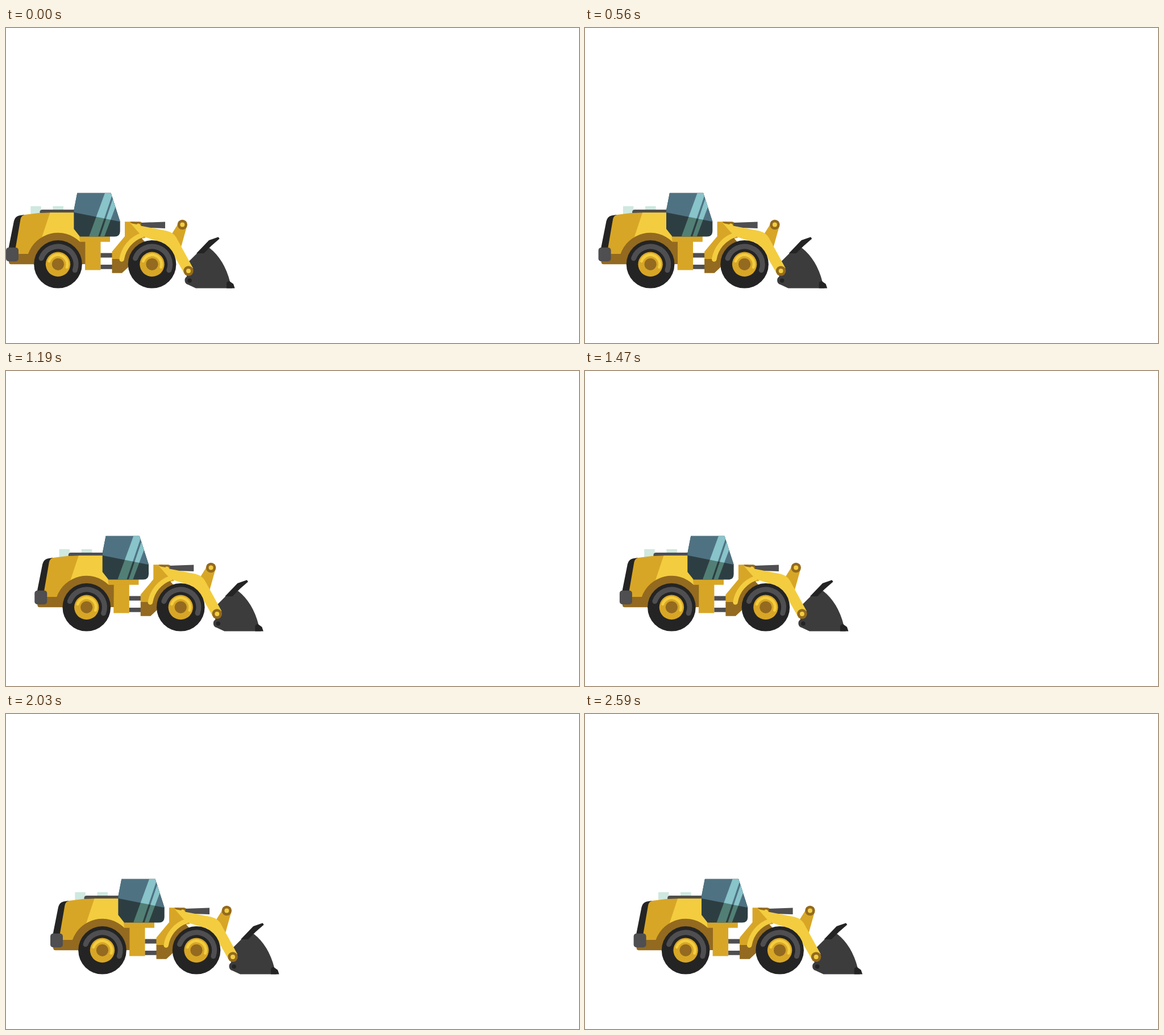
Recreate the animation shown at these times as an HTML page. Size 1008 px wide and 555 px high, loop 5.25 s.

```html
<!DOCTYPE html>
<html lang="en">
<head>
<meta charset="utf-8">
<title>Wheel loader</title>
<style>
  html, body { margin: 0; width: 100%; height: 100%; overflow: hidden; background: #fff; }
  svg { display: block; width: 100%; height: 100%; }
  .gold { fill: #d8a626; }
  .yellow { fill: #f3cd3f; }
  .brown { fill: #936a1f; }
  .steel { fill: #4f4e50; }
  .black { fill: #242424; }
  .mint { fill: #cfe8e0; }
  .shine { fill: none; stroke-linecap: round; }
</style>
</head>
<body>
<svg viewBox="0 0 1008 555">
  <defs>
    <clipPath id="cab">
      <path id="cabShape" d="M125.3 290.8H184.5L200.7 341V358Q200.7 367.5 191 367.5H130L119.4 354V321Z"/>
    </clipPath>
    <clipPath id="cabUpper"><path d="M110 323L210 343V280H110Z"/></clipPath>
    <g id="wheel">
      <circle class="black" r="42.3"/>
      <path class="shine" stroke="#4f4e50" stroke-width="9" d="M-29.5 -10.5A31.4 31.4 0 0 1 29.8 10.5"/>
      <circle class="gold" r="21.7"/>
      <path class="shine" stroke="#f3cd3f" stroke-width="5" d="M-15.6 -5.5A16.3 16.3 0 0 1 15.6 5.2"/>
      <circle class="brown" r="10.6"/>
    </g>
    <g id="bolt">
      <circle class="brown" r="8.7"/>
      <circle class="yellow" r="4"/>
    </g>
    <path id="stripes" d="M174 290.8H188L162 367.5H146ZM190 295L196 306L173 367.5H165.5Z"/>
  </defs>

  <g id="loader">
    <!-- rear body -->
    <path class="mint" d="M43.3 314H61.8V329H43.3ZM82.4 314H101V322H82.4Z"/>
    <path class="steel" d="M59.5 327V324.5Q59.5 320 64 320H121V327Z"/>
    <path class="brown" d="M5 397H60V416.2H9Q5 416.2 5 412Z"/>
    <path class="black" d="M4.5 388L14 340Q16 332 23 330.5L32 329L22 398H5Z"/>
    <path class="gold" d="M15 398L25.5 337Q27 330 33 329L57 326L77 325.3H121V354L130 367H183V376.5H166.5V426.5H139V398Z"/>
    <path class="yellow" d="M77.5 325.3H121V354L131 367V378H60Z"/>
    <path class="brown" d="M39 398A55.5 55.5 0 0 1 130 376.5H139.4V416H39Z"/>
    <path class="gold" d="M129 367H183V376.5H130Z"/>
    <rect class="steel" y="386.8" width="22" height="24.5" rx="5"/>
    <path class="steel" d="M166.5 396.6H188V404.5H166.5ZM166.5 417H188V424.7H166.5Z"/>

    <!-- cab -->
    <use href="#cabShape" fill="#2d3e42"/>
    <g clip-path="url(#cab)">
      <use href="#stripes" fill="#527f75"/>
      <g clip-path="url(#cabUpper)">
        <rect x="110" y="280" width="100" height="70" fill="#4f7282"/>
        <use href="#stripes" fill="#88c4ca"/>
      </g>
    </g>

    <!-- bucket -->
    <path fill="#3c3c3c" d="M358 387.5Q384 408 394 447L398 458.5H334L320 452A7.8 7.8 0 0 1 318 438L316 417L337 396Z"/>
    <path class="black" d="M335 397L357 374L373.5 368.2L375.6 371.2L361 384L348 397Z"/>
    <path class="black" d="M388 458.5V450Q388.5 446 393 446L400 451L402.5 458.5Z"/>
    <circle class="black" cx="323" cy="445" r="3.8"/>

    <!-- front frame and arm -->
    <path class="gold" d="M209 341.3H226L242 362L250 380L210 408H186.5V394L209 367Z"/>
    <path class="brown" d="M186.5 407H200L212 383L238 369L248 383L223 414L204 431.8H186.5Z"/>
    <path class="gold" d="M304 343L289 367L306 393L318 350Z"/>
    <path class="brown" d="M218 341.3H235Q240 341.5 240 347V354H232Z"/>
    <path class="steel" d="M238 343L280 341.5V353L238 351.5Z"/>
    <path class="yellow" d="M219 344L230 346A4 4 0 0 1 237 348.5L283 357.5Q295 361 299.5 369L329 423L315 435L294 398L276 378L246 369L234 361Z"/>
    <path class="shine" stroke="#f3cd3f" stroke-width="8.5" d="M203.6 407.5A54 54 0 0 1 239 365"/>
    <path fill="#fff" d="M239 371L247 369.5L259 374V378H246Z"/>
    <use href="#bolt" x="310.3" y="346.5"/>
    <use href="#bolt" x="321" y="428"/>

    <use href="#wheel" x="91.5" y="416.3"/>
    <use href="#wheel" x="257" y="416.3"/>
  </g>
</svg>
<script>
  const LOOP = 5250, STEP = 70;
  // step, horizontal travel
  const keys = [[0, 0], [4, 11.2], [8, 23.6], [13, 38.8], [21, 60.9], [29, 78], [37, 85.6]];
  const loader = document.getElementById('loader');

  function slope(i) {
    if (i === 0) return 2.6;
    if (i === keys.length - 1) return 0.3;
    const [t0, x0] = keys[i - 1], [t1, x1] = keys[i + 1];
    return (x1 - x0) / (t1 - t0);
  }

  function travel(step) {
    const last = keys.length - 1;
    if (step >= keys[last][0]) return keys[last][1];
    const i = keys.findIndex(key => key[0] > step) - 1;
    const [t0, x0] = keys[i], [t1, x1] = keys[i + 1];
    const span = t1 - t0, u = (step - t0) / span, v = 1 - u;
    return v * v * (1 + 2 * u) * x0 + u * u * (3 - 2 * u) * x1
      + span * u * v * (v * slope(i) - u * slope(i + 1));
  }

  function draw(ms) {
    const step = Math.floor((ms % LOOP) / STEP);
    loader.setAttribute('transform', `translate(${travel(step).toFixed(2)} 0)`);
  }

  const start = performance.now();
  function tick() {
    draw(performance.now() - start);
    requestAnimationFrame(tick);
  }
  tick();
</script>
</body>
</html>
```
